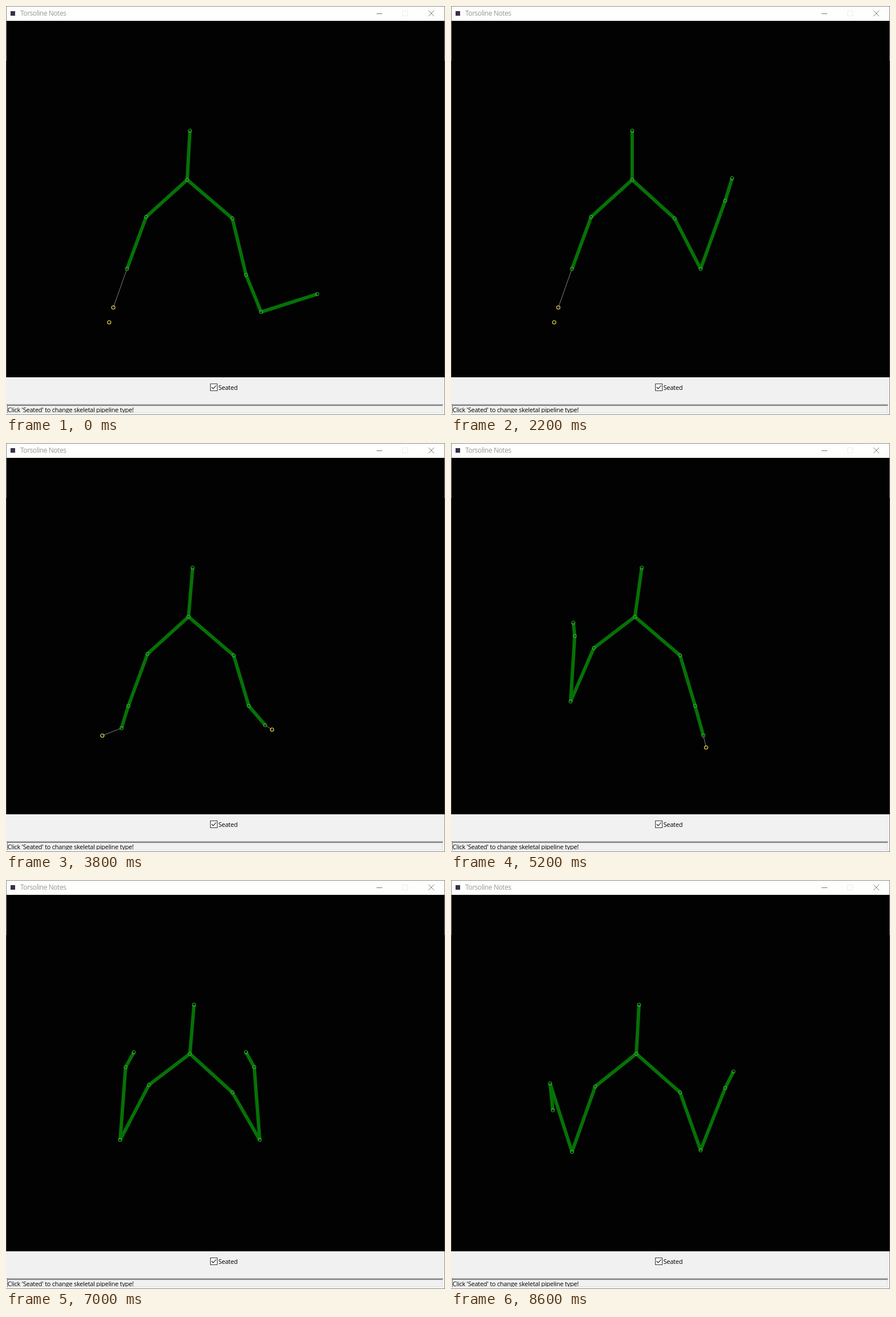
Write an HTML page that moves like this. It is 770 px wide and 716 px high and loops after 8.8 s.

```html
<!DOCTYPE html>
<html lang="en">
<head>
<meta charset="utf-8">
<title>Torsoline Notes</title>
<style>
  html, body { margin: 0; width: 100%; height: 100%; overflow: hidden; background: #f1f1f2; }
  svg { display: block; width: 770px; height: 716px; }
  text { font: 11px "Open Sans", "Noto Sans", sans-serif; letter-spacing: -.25px; fill: #000; }
  .title { font-size: 12px; letter-spacing: -.45px; fill: #999; }
  .ui { shape-rendering: crispEdges; }
  .bone { stroke: #057205; stroke-width: 6; }
  .bone.weak { stroke: #808080; stroke-width: 1; }
  .joint { fill: none; stroke: #44b844; }
  .joint.weak { stroke: #f0e448; stroke-width: 1.1; }
</style>
</head>
<body>
<svg viewBox="0 0 770 716">
  <defs><clipPath id="status"><rect x="2" y="700" width="764" height="12"/></clipPath></defs>
  <g class="ui">
    <rect width="770" height="716" fill="#f1f1f2"/>
    <rect width="770" height="26" fill="#fefefc"/>
    <rect x="1" y="26" width="768" height="624" fill="#020203"/>
    <path d="M0 .5H770M.5 0V96M769.5 0V96M0 715.5H770" stroke="#8c8c8c"/>
    <path d="M.5 96V650M769.5 96V650" stroke="#444"/>
    <path d="M769.5 650V716" stroke="#8c8c8c"/>
    <rect x="8" y="9" width="8" height="8" fill="#3b3048"/>
    <path d="M650 13.5H660" stroke="#777"/>
    <rect x="695.5" y="8.5" width="9" height="9" fill="none" stroke="#ececea"/>
    <path d="M1 698H767" stroke="#a4a4a4" stroke-width="2"/>
    <path d="M2 699.5H766M2.5 698V713" stroke="#6c6c6c"/>
    <path d="M2 713.5H767M766.5 698V714" stroke="#fff"/>
    <path d="M3 712.5H766M765.5 700V713" stroke="#dcdcdc"/>
    <rect x="358.5" y="661.5" width="12" height="12" fill="#fff" stroke="#333"/>
  </g>
  <path d="M741 8L751 18M751 8L741 18" stroke="#808080"/>
  <path d="M360.5 667L363.3 670L368.7 664.3" fill="none" stroke="#333" stroke-width="1.2"/>
  <text class="title" x="25" y="17">Torsoline Notes</text>
  <text x="372.5" y="672">Seated</text>
  <g clip-path="url(#status)"><text x="2.7" y="711">Click 'Seated' to change skeletal pipeline type!</text></g>
  <g id="bones"></g>
  <g id="joints"></g>
</svg>
<script>
const LOOP = 8800, STEP = 200;

// Arm points are [outward, down] from the neck, in cells of the sensor grid.
// "seen" counts the joints after the shoulder that are tracked, not guessed.
const HANG = [44, 60];
const arm = (wrist, hand, seen = 3, elbow = HANG) => ({ points: [elbow, wrist, hand], seen });

const rest = arm([54, 86], [57, 96], 1);
const fold = arm([47, 9], [41, -1], 3, [51, 58]);

const poses = [
  { at: 0, lean: 2, left: rest, right: arm([54, 89], [95, 77], 3, [43, 64]) },
  { at: 1400, lean: 0, left: arm([68, 86], [76, 96], 1), right: arm([73, 17], [82, 0], 3, [54, 61]) },
  { at: 2200, lean: 0, left: rest, right: arm([68, 14], [73, -1], 3, [50, 60]) },
  { at: 3800, lean: 3, left: arm([49, 75], [63, 80], 2), right: arm([56, 73], [61, 76], 2) },
  { at: 5200, lean: 5, left: arm([44, 13], [45, 4], 3, [47, 57]), right: arm([50, 80], [52, 88], 2) },
  { at: 7000, lean: 3, left: fold, right: fold },
  { at: 8600, lean: 2, left: arm([63, 20], [61, 38], 3, [47, 66]), right: arm([65, 23], [71, 12], 3, [47, 65]) }
];

const mix = (a, b, p) => a + (b - a) * p;
const mixPoint = (a, b, p) => a.map((v, i) => mix(v, b[i], p));

function set(el, attrs) {
  for (const key in attrs) el.setAttribute(key, attrs[key]);
}

function add(parent, tag) {
  const el = document.createElementNS("http://www.w3.org/2000/svg", tag);
  return document.getElementById(parent).appendChild(el);
}

// Joints: head, neck, then shoulder, elbow, wrist and hand of each arm.
const joints = Array.from({ length: 10 }, () => add("joints", "circle"));
const links = joints.slice(1).map((_, i) => [i === 5 ? 1 : i, i + 1]);
const bones = links.map(() => add("bones", "line"));

function armAt(a, b, p, side) {
  const points = a.points.map((pt, i) => mixPoint(pt, b.points[i], p));
  const [elbow, wrist] = points;
  const seen = (p < .5 ? a : b).seen;
  // The left shoulder lifts with its wrist; the right one is drawn in by a wide elbow.
  const lift = Math.max(0, 75 - wrist[1]) / 16;
  const shoulder = side < 0 ? [30, 25 - lift] : [33 - (elbow[0] - 43) / 4, 26];
  return [shoulder, ...points].map(([out, down], i) => ({ x: side * out, y: down, weak: i > seen }));
}

function poseAt(time) {
  const i = poses.findLastIndex(pose => pose.at <= time);
  const a = poses[i], b = poses[i + 1] || a;
  const t = a === b ? 0 : (time - a.at) / (b.at - a.at);
  const p = t * t * (3 - 2 * t);
  const neck = { x: 131.6 + time * .00037, y: 107 };
  const body = [
    { x: mix(a.lean, b.lean, p), y: -33.5 },
    { x: 0, y: 0 },
    ...armAt(a.left, b.left, p, -1),
    ...armAt(a.right, b.right, p, 1)
  ];
  return body.map(({ x, y, weak }) => ({
    x: 1 + 2.4 * Math.round(Math.round(neck.x) + x),
    y: 26 + 2.6 * Math.round(neck.y + y),
    weak
  }));
}

function draw(time) {
  const pose = poseAt(Math.floor(time / STEP) * STEP);
  joints.forEach((el, j) => {
    const { x, y, weak } = pose[j];
    set(el, { cx: x, cy: y, r: 3, class: weak ? "joint weak" : "joint" });
  });
  bones.forEach((el, i) => {
    const [a, b] = links[i].map(j => pose[j]);
    set(el, {
      x1: a.x, y1: a.y, x2: b.x, y2: b.y,
      class: a.weak || b.weak ? "bone weak" : "bone",
      visibility: a.weak && b.weak ? "hidden" : "visible"
    });
  });
}

const start = performance.now();
function tick() {
  draw((performance.now() - start) % LOOP);
  requestAnimationFrame(tick);
}
tick();
</script>
</body>
</html>
```
